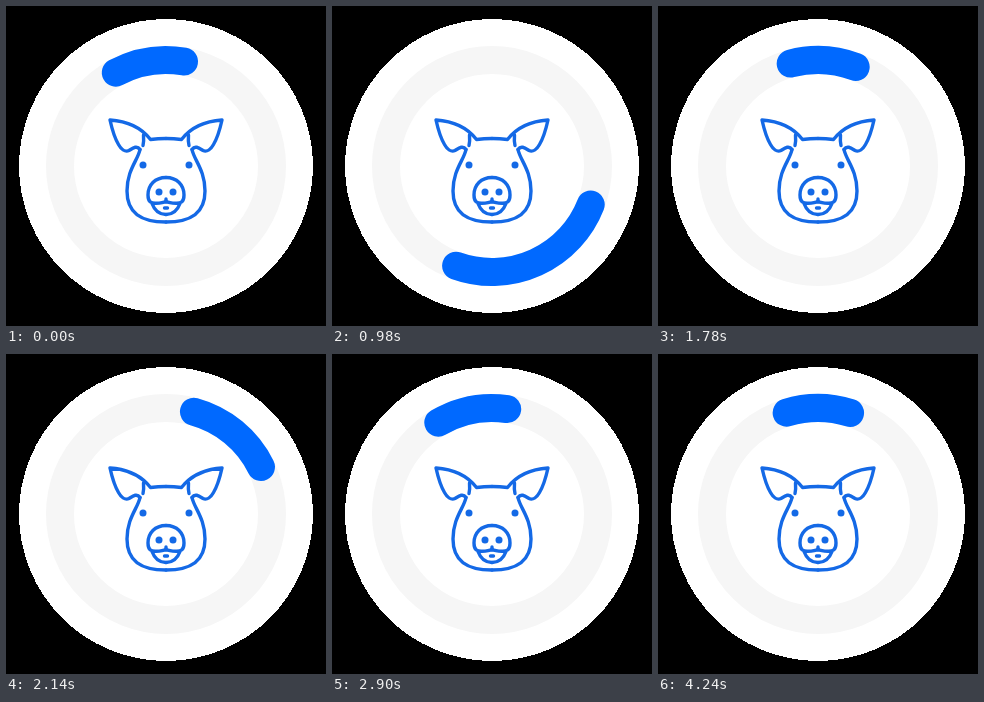
These frames come from a looping animation (320x320 px, 4.26 s). An HTML page:

```html
<!DOCTYPE html>
<html lang="en">
<head>
<meta charset="utf-8">
<title>Pig spinner</title>
<style>
html, body { margin: 0; height: 100%; overflow: hidden; background: #000; }
svg { display: block; width: 100vw; height: 100vh; }
</style>
</head>
<body>
<svg viewBox="0 0 320 320" fill="none" stroke-linecap="round" stroke-linejoin="round">
  <circle cx="160" cy="160" r="147" fill="#fff" shape-rendering="crispEdges"/>
  <circle cx="160" cy="160" r="106" stroke="#f6f6f6" stroke-width="28"/>
  <path id="arc" stroke="#0069ff" stroke-width="28"/>
  <g stroke="#1469e6" stroke-width="3.4">
    <g id="half">
      <path d="M134 143.500C131 139 127 142 123 144.500C119 146.500 115 143 112.500 138.500C108 131 106 123 104 114C120 115 134 120 144.500 133.500Q152 132.500 160 132.500"/>
      <path d="M137.500 129Q138 135 137 139.500M134 143.500C132 154 121 164 121 185C121 207 135 216 160 216"/>
      <path d="M160 171.500C149 171.500 142 179 142 189C142 196 145 197.500 150 197.300Q157 197 160 195.500M146 197.500Q150 208.500 160 208.500"/>
      <g fill="#1469e6" stroke="none">
        <circle cx="137" cy="159" r="3.500"/>
        <circle cx="153" cy="186" r="3.500"/>
      </g>
    </g>
    <use href="#half" transform="matrix(-1 0 0 1 320 0)"/>
    <path d="M160 193V196M158.500 202H161.500"/>
  </g>
</svg>
<script>
const LOOP = 4260, SPIN = 1460, LEAD = 1220, REST_AT = 3160;
const R = 106, HALF = 17.4, STRETCH = 0.1725;

// [ms into a spin, degrees turned]
const keys = [[0, 0], [80, 2.7], [300, 20.3], [400, 32.6], [460, 42.9], [720, 136],
  [840, 259], [1000, 316], [1060, 329.3], [1200, 348.6], [1390, 358.5], [SPIN, 360]];

const slope = i => (keys[i + 1][1] - keys[i][1]) / (keys[i + 1][0] - keys[i][0]);

function tangent(i) {
  if (i === 0 || i === keys.length - 1) return 0;
  const before = keys[i][0] - keys[i - 1][0], after = keys[i + 1][0] - keys[i][0];
  return (slope(i - 1) * after + slope(i) * before) / (before + after);
}

// Smooth cubic through the keys
function turn(ms) {
  const i = Math.max(0, keys.findIndex(k => k[0] > ms) - 1);
  const [t0, a0] = keys[i], [t1, a1] = keys[i + 1];
  const d = t1 - t0, u = (ms - t0) / d, v = 1 - u;
  return a0 + (a1 - a0) * u * u * (3 - 2 * u)
    + d * u * v * (v * tangent(i) - u * tangent(i + 1));
}

function point(deg) {
  const a = deg * Math.PI / 180;
  return `${160 + R * Math.sin(a)} ${160 - R * Math.cos(a)}`;
}

const arc = document.getElementById('arc');
const start = performance.now();

function draw(now) {
  const t = Math.max(0, now - start) % LOOP;
  const angle = t < REST_AT ? turn((t + LEAD) % SPIN) : 0;
  // The bar lengthens with its distance from the top
  const reach = HALF + STRETCH * Math.min(angle, 360 - angle);
  const mid = angle + 0.2;
  arc.setAttribute('d', `M${point(mid - reach)}A${R} ${R} 0 0 1 ${point(mid + reach)}`);
  requestAnimationFrame(draw);
}
draw(start);
</script>
</body>
</html>
```
